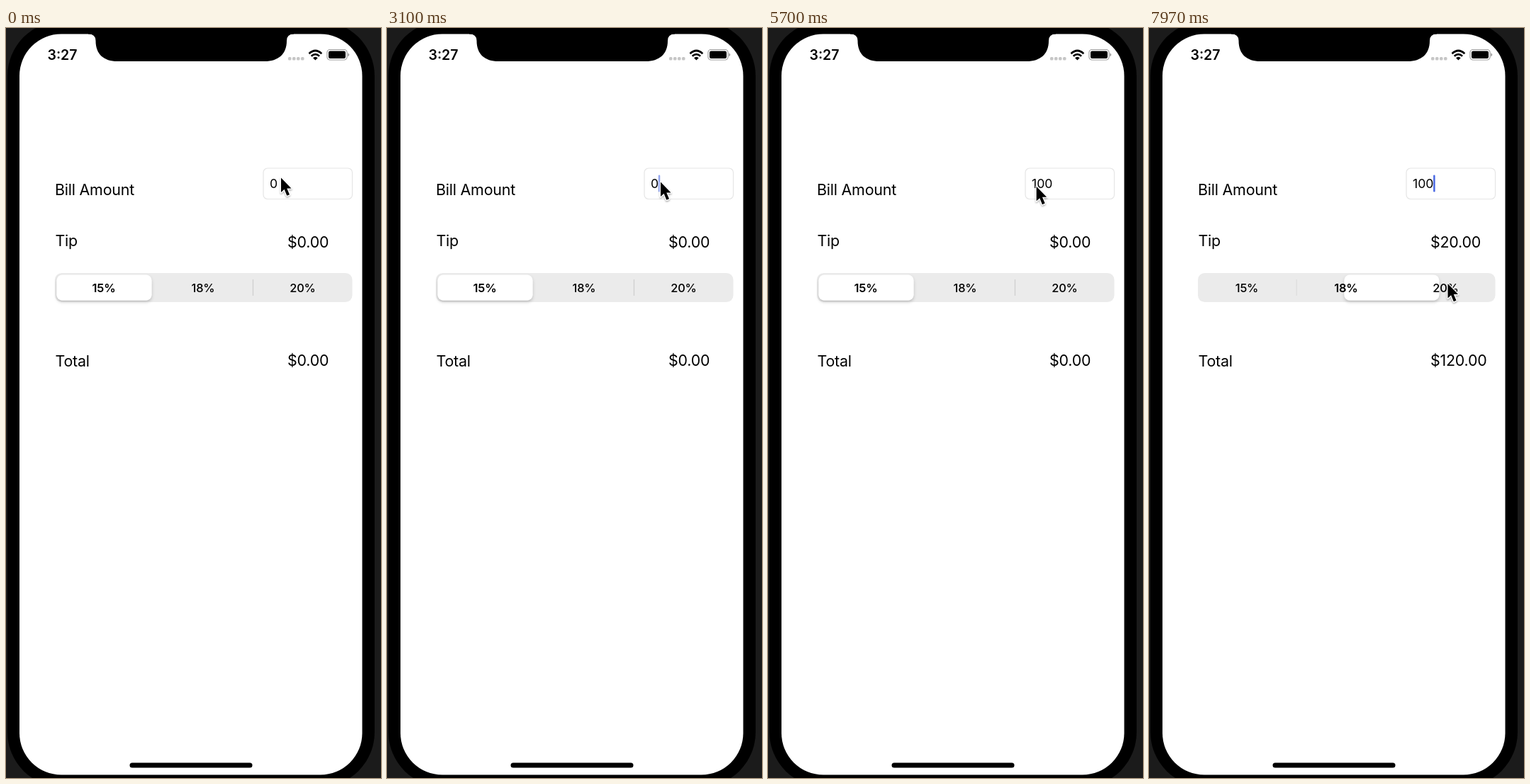
An HTML page that plays this animation: 529 px wide and 1059 px high, repeating every 8 s.

```html
<!DOCTYPE html>
<html lang="en">
<head>
<meta charset="utf-8">
<title>Tip calculator</title>
<style>
html, body { margin: 0; width: 100%; height: 100%; overflow: hidden; background: #1b1b1b; }
svg { display: block; width: 529px; height: 1059px; }
text { font-family: Inter, Roboto, sans-serif; fill: #000; }
.label { font-size: 21.4px; letter-spacing: -0.2px; }
.seg text { font-size: 16.4px; font-weight: 500; text-anchor: middle; letter-spacing: -0.2px; }
.seg text.on { font-weight: 600; }
.menu text { font-size: 17px; fill: #fff; text-anchor: middle; }
</style>
</head>
<body>
<svg viewBox="0 0 529 1059">
  <defs>
    <filter id="soft" x="-20%" y="-40%" width="140%" height="200%">
      <feDropShadow dx="0" dy="2.5" stdDeviation="2.2" flood-opacity="0.2"/>
    </filter>
    <filter id="drop" x="-50%" y="-30%" width="220%" height="180%">
      <feDropShadow dx="0" dy="1.5" stdDeviation="1.3" flood-opacity="0.35"/>
    </filter>
  </defs>

  <rect width="529" height="1059" fill="#1b1b1b"/>
  <rect x="2" y="-10" width="518" height="1082" rx="78"/>
  <rect x="19" y="8.5" width="483.5" height="1046" rx="59" fill="#fff"/>
  <path d="M116 8H406V8.5Q396 8.5 396 18C396 37 384 47 365 47H157C138 47 126.500 37 126.500 18Q126.500 8.500 116 8.500Z"/>
  <rect x="174.500" y="1037.500" width="173" height="7" rx="3.500"/>

  <text x="58.500" y="45" font-size="19.500" font-weight="600">3:27</text>
  <g fill="#c6c6c6">
    <rect x="398" y="41" width="4.500" height="4.500" rx="1.500"/>
    <rect x="404" y="41" width="4.500" height="4.500" rx="1.500"/>
    <rect x="410" y="41" width="4.500" height="4.500" rx="1.500"/>
    <rect x="416" y="41" width="4.500" height="4.500" rx="1.500"/>
  </g>
  <g fill="none" stroke="#000" stroke-width="2.700">
    <path d="M427.500 36.200Q436.400 27.800 445.300 36.200"/>
    <path d="M430.700 39.800Q436.400 34.600 442.100 39.800"/>
  </g>
  <path d="M433 42.200Q436.400 39.200 439.800 42.200L436.400 45.600Z"/>
  <rect x="453" y="30.500" width="28" height="14.500" rx="4" fill="none" stroke="#9c9c9c" stroke-width="1.200"/>
  <rect x="455" y="32.500" width="24" height="10.500" rx="2.300"/>
  <path d="M482.300 35.500Q484.300 36 484.300 37.800T482.300 40.200Z" fill="#9c9c9c"/>

  <g class="label">
    <text x="69" y="236">Bill Amount</text>
    <text x="69.500" y="308">Tip</text>
    <text x="69.500" y="478">Total</text>
    <text x="397" y="309.500" id="tip"></text>
    <text x="397" y="477" id="total"></text>
  </g>

  <rect x="363" y="198" width="125.500" height="43.500" rx="6" fill="#fff" stroke="#e5e5e5" stroke-width="1.200"/>
  <text x="372" y="226.300" font-size="17.700" id="bill"></text>
  <rect y="207.500" width="2.500" height="24" rx="1.200" fill="#3f60e2" id="caret"/>

  <g class="seg">
    <rect x="69" y="346" width="419.500" height="41" rx="9.500" fill="#ebebeb"/>
    <rect x="207.500" y="355" width="1.300" height="23" fill="#cfcfcf" id="div0"/>
    <rect x="347.800" y="355" width="1.300" height="23" fill="#cfcfcf" id="div1"/>
    <rect x="71.500" y="348.500" width="134" height="36" rx="8" fill="#fff" filter="url(#soft)" id="thumb"/>
    <text x="138" y="372.800">15%</text>
    <text x="278" y="372.800">18%</text>
    <text x="418.500" y="372.800">20%</text>
  </g>

  <g class="menu" id="menu">
    <path d="M278.500 137.500H481.500Q489.500 137.500 489.500 145.500V176.500Q489.500 184.500 481.500 184.500H395L383.500 196L372 184.500H278.500Q270.500 184.500 270.500 176.500V145.500Q270.500 137.500 278.500 137.500Z" fill="#1e1e1e"/>
    <rect x="366.300" y="137.500" width="1.300" height="47"/>
    <g id="items">
      <text x="318.500" y="167">Select</text>
      <text x="428" y="167">Select All</text>
    </g>
  </g>

  <path id="pointer" d="M0 0V20.500L4.600 16.300L8.300 25.300L12 23.700L8.300 15H14.500Z" stroke="#fff" stroke-width="2.400" paint-order="stroke" stroke-linejoin="round" filter="url(#drop)"/>
</svg>
<script>
const LOOP = 8000;
const $ = id => document.getElementById(id);
const labels = document.querySelectorAll('.seg text');
const clamp = v => Math.max(0, Math.min(1, v));
const ramp = (t, a, b) => clamp((t - a) / (b - a));
const smooth = u => u * u * (3 - 2 * u);

// time, x, y of the pointer tip
const path = [
  [0, 388, 211.500], [300, 388, 211.500], [700, 387, 214], [1230, 386, 217.500],
  [5500, 386, 217.500], [5720, 378.500, 224], [6290, 297.500, 358], [6480, 297.500, 361],
  [7200, 297.500, 361], [7620, 421.500, 361], [LOOP, 421.500, 361]
];

// time, text in the bill field
const typed = [[0, '0'], [3600, ''], [4400, '1'], [4700, '10'], [5000, '100']];
const PICK = [6600, 7815], SLIDE = 330;

function pointerAt(t) {
  const i = path.findIndex(k => k[0] > t);
  const a = path[i - 1], b = path[i];
  const u = smooth(ramp(t, a[0], b[0]));
  return [a[1] + (b[1] - a[1]) * u, a[2] + (b[2] - a[2]) * u];
}

function caretAlpha(t) {
  if (t >= 4400 && t < 5450) return 1;
  const p = (t < 4400 ? t : t + 200) % 1000;
  return ramp(p, 0, 180) * (1 - ramp(p, 680, 800));
}

function setText(el, s) {
  if (el.textContent !== s) el.textContent = s;
}

function draw(t) {
  const bill = typed.filter(k => k[0] <= t).pop()[1];
  setText($('bill'), bill);
  const w = bill ? $('bill').getComputedTextLength() - 0.7 : 0;
  $('caret').setAttribute('x', 372.3 + w);
  $('caret').setAttribute('opacity', caretAlpha(t));

  const rate = t < PICK[0] ? 0 : t < PICK[1] ? 18 : 20;
  setText($('tip'), '$' + rate.toFixed(2));
  setText($('total'), '$' + (rate && rate + 100).toFixed(2));

  const pos = PICK.reduce((s, p) => s + smooth(ramp(t, p, p + SLIDE)), 0);
  $('thumb').setAttribute('transform', `translate(${pos * 139.7} 0)`);
  $('div0').setAttribute('opacity', clamp(pos - 1));
  $('div1').setAttribute('opacity', clamp(1 - pos * 2.2));
  labels.forEach((el, i) => el.classList.toggle('on', i === Math.round(pos)));

  const menu = ramp(t, 3200, 3370) * (1 - ramp(t, 3560, 3729));
  $('menu').setAttribute('opacity', menu);
  $('items').setAttribute('opacity', ramp(menu, 0.2, 0.9));

  $('pointer').setAttribute('transform', `translate(${pointerAt(t)})`);
}

const start = performance.now();
function tick() {
  draw((performance.now() - start) % LOOP);
  requestAnimationFrame(tick);
}
tick();
</script>
</body>
</html>
```
